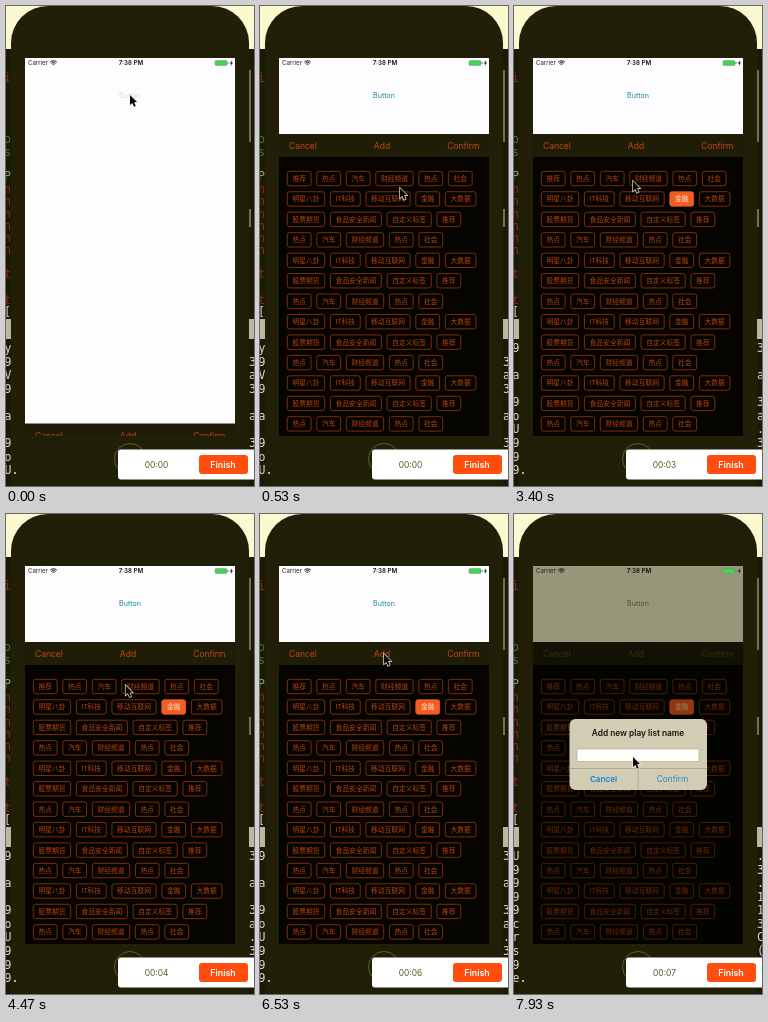
An HTML page with a canvas for the animation above (8000 ms loop, 248 px wide and 480 px high).

```html
<!DOCTYPE html>
<html lang="zh-CN">
<head>
<meta charset="utf-8">
<style>
  html, body { margin: 0; width: 100%; height: 100%; overflow: hidden; background: #1c1a06; }
  canvas { display: block; width: 248px; height: 480px; }
</style>
</head>
<body>
<canvas></canvas>
<script>
const LOOP = 8000, W = 248, H = 480;
const SCREEN = { x: 19, y: 52, w: 210, h: 378 };
const canvas = document.querySelector('canvas');
const ctx = canvas.getContext('2d');
const scale = window.devicePixelRatio || 1;
canvas.width = W * scale;
canvas.height = H * scale;

const UI = 'Inter, "Liberation Sans", sans-serif';
const CJK = '"Noto Sans CJK SC", "Noto Sans CJK", sans-serif';
const MONO = '"DejaVu Sans Mono", monospace';

const rowA = '推荐 热点 汽车 财经频道 热点 社会'.split(' ');
const rowB = '明星八卦 IT科技 移动互联网 金融 大数据'.split(' ');
const rowC = '股票期货 食品安全新闻 自定义标签 推荐'.split(' ');
const rowD = '热点 汽车 财经频道 热点 社会'.split(' ');
const rows = [rowA];
for (let i = 0; i < 4; i++) rows.push(rowB, rowC, rowD);

// [time, row, column] of each tag tap
const taps = [[1250, 0, 3], [2060, 0, 4], [2650, 1, 3]];
// The second tag stays highlighted until its tap registers.
// [time, x, y] of the pointer tip
const pointerPath = [
  [0, 124, 89], [150, 124, 90], [530, 140, 182], [900, 135, 173], [1500, 135, 173],
  [1900, 167, 179], [2200, 167, 180], [2500, 167, 191], [2850, 167, 191],
  [3350, 119, 175], [4300, 119, 174], [5100, 125, 145], [5900, 125, 145],
  [6400, 124, 140], [7250, 124, 140], [7850, 119, 243], [8000, 119, 243]
];
// [time, number of console lines scrolled]
const scrolls = [[0, 0], [1300, 1], [2100, 2], [2700, 3], [6750, 9]];
const logLeft = 'y9V9 a 9oU9999crs9e';
const logRight = ' 3a3 a 3a.3.113C(r3';

const clamp = v => Math.min(1, Math.max(0, v));
const mix = (a, b, p) => a + (b - a) * p;
const mixRgb = (a, b, p) => `rgb(${a.map((v, i) => Math.round(mix(v, b[i], p)))})`;
const easeInOut = p => p < .5 ? 2 * p * p : 1 - 2 * (1 - p) ** 2;
const easeOut = p => 1 - (1 - p) ** 3;
const latest = (list, t) => list.filter(item => item[0] <= t).pop();

function rect(x, y, w, h, fill) {
  ctx.fillStyle = fill;
  ctx.fillRect(x, y, w, h);
}

function rounded(x, y, w, h, r, fill, stroke, lineWidth = 1) {
  ctx.beginPath();
  ctx.roundRect(x, y, w, h, r);
  if (fill) { ctx.fillStyle = fill; ctx.fill(); }
  if (stroke) { ctx.strokeStyle = stroke; ctx.lineWidth = lineWidth; ctx.stroke(); }
}

function text(str, x, y, size, color, align = 'center', weight = 400, family = UI) {
  ctx.font = `${weight} ${size}px ${family}`;
  ctx.textAlign = align;
  ctx.textBaseline = 'alphabetic';
  ctx.fillStyle = color;
  ctx.fillText(str, x, y + size * .36);
}

function drawDesktop(t) {
  rect(0, 0, W, H, '#1c1a06');
  rect(0, 0, W, 43, '#fbf9cf');
  rect(0, 313, W, 20, '#b9b8a0');
  rect(243.5, 64, 1, 72, '#c9c7a0');
  rect(243.5, 203, 1, 18, '#c9c7a0');
  rounded(5, 0, 238, 540, 37, '#211f08');

  const mono = (ch, x, y, color) => text(ch, x, y, 11.5, color, 'left', 400, MONO);
  ctx.save();
  ctx.beginPath();
  ctx.rect(0, 0, 5.5, H);
  ctx.rect(243, 0, 5, H);
  ctx.clip();
  mono('i', -2, 72, '#8a2a14');
  mono('o', -2, 133, '#3d7a35');
  mono('s', -2, 146, '#3d7a35');
  mono('P', -2, 170, '#7fae6a');
  for (let i = 0; i < 6; i++) mono('n', -2, 183 + i * 12.2, '#8c2c12');
  mono('t', -2, 268, '#8c2c12');
  mono('t', -2, 294, '#8c2c12');
  mono('[', -2, 306, '#d5d3c4');
  const first = latest(scrolls, t)[1];
  for (let i = 0; i < 10; i++) {
    const y = 342 + i * 13.55;
    mono(logLeft[first + i], -1.5, y, '#dddccb');
    mono(logRight[first + i], 243, y, '#dddccb');
  }
  ctx.restore();
  rect(8, 466, 2, 2, '#b5b39f');

  ctx.beginPath();
  ctx.arc(124, 453, 15.5, 0, Math.PI * 2);
  ctx.strokeStyle = '#625d2c';
  ctx.lineWidth = 1;
  ctx.stroke();
}

function drawStatusBar() {
  text('Carrier', 22, 57, 6.1, '#222', 'left');
  text('7:38 PM', 125, 57, 6.2, '#111', 'center', 600);
  ctx.strokeStyle = '#111';
  ctx.lineWidth = 1;
  for (const r of [1.3, 3, 4.7]) {
    ctx.beginPath();
    ctx.arc(47.5, 59.5, r, -Math.PI * .75, -Math.PI * .25);
    ctx.stroke();
  }
  rounded(209, 54.5, 12, 5, 1.3, '#42d455', '#777', .4);
  rect(221.5, 56, 1, 2, '#777');
  ctx.beginPath();
  [[226.2, 54], [223.8, 57.5], [225.2, 57.5], [224.7, 60], [227, 56.6], [225.6, 56.6]]
    .forEach(p => ctx.lineTo(...p));
  ctx.fillStyle = '#222';
  ctx.fill();
}

function drawTags(t) {
  const tap = latest(taps, t);
  rows.forEach((row, r) => {
    let x = 27.3;
    const y = 172.5 + r * 20.45;
    row.forEach((label, c) => {
      ctx.font = `400 6.8px ${CJK}`;
      const w = ctx.measureText(label).width + 10.2;
      const on = tap && tap[1] === r && tap[2] === c;
      rounded(x, y - 7.2, w, 14.4, 2.2, on ? '#f45c20' : null, on ? '#f45c20' : '#9c360a', .8);
      text(label, x + w / 2, y, 6.8, on ? '#ffe4d0' : '#bd420e', 'center', 400, CJK);
      x += w + 5.7;
    });
  });
}

function drawSheet(t, dim) {
  const offset = 302 * (1 - easeInOut(clamp((t + 56) / 400)));
  ctx.save();
  ctx.translate(0, offset);
  rect(19, 128, 210, 302, '#050400');
  rect(19, 128, 210, 23, '#1f1c07');
  const color = mixRgb([194, 72, 18], [84, 78, 36], dim);
  text('Cancel', 29, 140, 8.5, color, 'left');
  text('Add', 122, 140, 8.5, color);
  text('Confirm', 219.5, 140, 8.5, color, 'right');
  drawTags(t);
  ctx.restore();
}

function drawAlert(t) {
  const shown = clamp((t - 6930) / 420);
  if (!shown) return;
  const zoom = 1 + .32 * (1 - easeOut(shown));
  const settle = clamp((t - 7130) / 300);
  ctx.save();
  ctx.globalAlpha = clamp(shown * 1.9);
  ctx.translate(124, 240.5);
  ctx.scale(zoom, zoom);
  ctx.translate(-124, -240.5);
  rounded(55.5, 205, 137.5, 71, 6, mixRgb([172, 169, 118], [211, 204, 180], settle));
  text('Add new play list name', 124, 219, 8.3, '#17150c', 'center', 600);
  rounded(63, 235, 122, 12.5, .5, mixRgb([250, 246, 190], [255, 255, 250], settle), '#99947c', .5);
  rect(55.5, 254, 137.5, .7, '#a39d80');
  rect(123.8, 254, .7, 22, '#a39d80');
  text('Cancel', 89.5, 265, 8.1, '#1583cf', 'center', 600);
  text('Confirm', 158.5, 265, 8.3, '#2a86c4');
  ctx.restore();
}

function drawScreen(t) {
  const dim = clamp((t - 6900) / 250);
  ctx.save();
  ctx.beginPath();
  ctx.rect(SCREEN.x, SCREEN.y, SCREEN.w, SCREEN.h);
  ctx.clip();
  rect(SCREEN.x, SCREEN.y, SCREEN.w, SCREEN.h, '#fdfdff');
  const label = t < 6900
    ? mixRgb([188, 236, 214], [26, 134, 150], clamp((t - 60) / 250))
    : mixRgb([26, 134, 150], [128, 128, 128], dim);
  text('Button', 124, 89, 7.1, label);
  drawSheet(t, dim);
  if (dim) {
    ctx.globalCompositeOperation = 'multiply';
    rect(SCREEN.x, SCREEN.y, SCREEN.w, SCREEN.h, mixRgb([255, 255, 255], [153, 151, 120], dim));
    ctx.globalCompositeOperation = 'source-over';
  }
  drawStatusBar();
  drawAlert(t);
  ctx.restore();
}

function drawRecorder(t) {
  const seconds = Math.max(0, Math.floor((t - 250) / 1000));
  rounded(112, 443.5, 140, 30, 3, '#fff');
  text('00:0' + seconds, 150.5, 458.5, 8.4, '#5a5826');
  rounded(193, 449, 49, 19, 3, '#ff4d0d');
  text('Finish', 217, 458.5, 8.8, '#fff', 'center', 600);
}

function drawPointer(t) {
  const i = pointerPath.findIndex(p => p[0] > t);
  const [t0, x0, y0] = pointerPath[i - 1], [t1, x1, y1] = pointerPath[i];
  const p = easeInOut((t - t0) / (t1 - t0));
  ctx.save();
  ctx.translate(mix(x0, x1, p), mix(y0, y1, p));
  ctx.beginPath();
  [[0, 0], [0, 10], [2.3, 8], [4, 11.8], [5.7, 11], [4.1, 7.3], [7, 7.1]]
    .forEach(q => ctx.lineTo(...q));
  ctx.closePath();
  ctx.fillStyle = '#0a0a06';
  ctx.strokeStyle = '#f4f2e4';
  ctx.lineWidth = 1.3;
  ctx.stroke();
  ctx.fill();
  ctx.restore();
}

function frame() {
  const t = performance.now() % LOOP;
  ctx.setTransform(scale, 0, 0, scale, 0, 0);
  drawDesktop(t);
  drawScreen(t);
  drawRecorder(t);
  drawPointer(t);
  requestAnimationFrame(frame);
}
frame();
</script>
</body>
</html>
```
